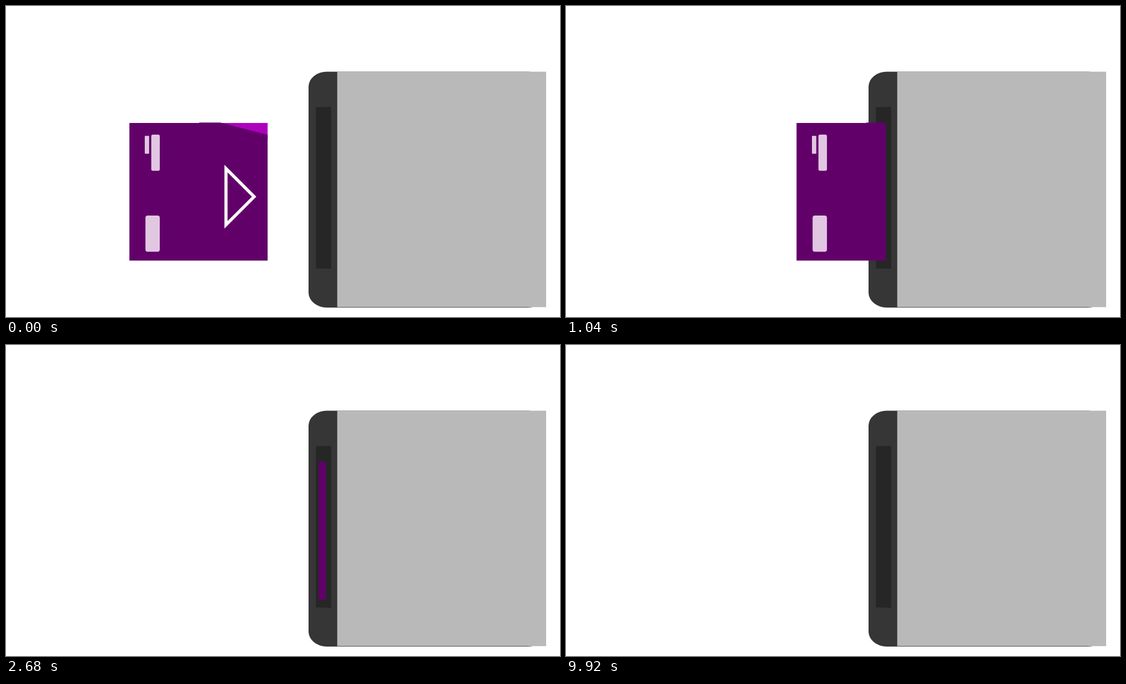
An HTML page for the animation above (9.96 s loop, 998 px wide and 561 px high).

```html
<!DOCTYPE html>
<html lang="en">
<head>
<meta charset="utf-8">
<title>Card reader</title>
<style>
  html, body { margin: 0; width: 100%; height: 100%; overflow: hidden; background: #fff; }
  svg { display: block; width: 998px; height: 561px; }

  .card { animation: insert 9960ms infinite; }
  .led { animation: blink 9960ms step-end infinite; }

  /* Quick approach, then a slow push, advancing every 40 ms */
  @keyframes insert {
    0% { transform: translateX(0); animation-timing-function: steps(40, end); }
    16.0643% { transform: translateX(297px); animation-timing-function: step-end; }
    16.4659% { transform: translateX(301.6px); animation-timing-function: steps(34, end); }
    30.1205%, 100% { transform: translateX(353.4px); }
  }

  /* Four short blinks, then steady */
  @keyframes blink {
    0%, 22.0884%, 32.1285%, 42.1687%, 52.2088%, 99.5984%, 100% { opacity: 0; }
    18.8755%, 28.9157%, 38.9558%, 49.3976%, 59.0361% { opacity: 1; }
  }
</style>
</head>
<body>
<svg viewBox="0 0 998 561">
  <clipPath id="mouth"><rect width="575.3" height="561"/></clipPath>

  <rect x="545" y="118.5" width="428" height="425.5" rx="33" ry="27" fill="#363636"/>
  <rect x="596.7" y="118.5" width="376.3" height="424.7" fill="#b9b9b9"/>
  <path d="M558.2 182.6L585.6 182V474L558.2 473.2Z" fill="#262626"/>
  <circle class="led" cx="572.3" cy="503.7" r="10.5" fill="#00a81e"/>

  <g clip-path="url(#mouth)">
    <g class="card">
      <path d="M380 211H471.3V240Z" fill="#ad00bd"/>
      <path d="M222.3 211H348V210.3H386L471.3 232.2V459.2H222.3Z" fill="#62006a"/>
      <g fill="#e1c7e1">
        <rect x="250" y="234.2" width="7.8" height="32.4" rx="1"/>
        <rect x="261.7" y="232" width="15.3" height="65.2" rx="3"/>
        <rect x="251.2" y="378" width="25.8" height="65.2" rx="4"/>
      </g>
      <path d="M396.3 293.3L447 344L396.3 394.7Z" fill="none" stroke="#fff" stroke-width="5.6"/>
    </g>
  </g>
</svg>
</body>
</html>
```
